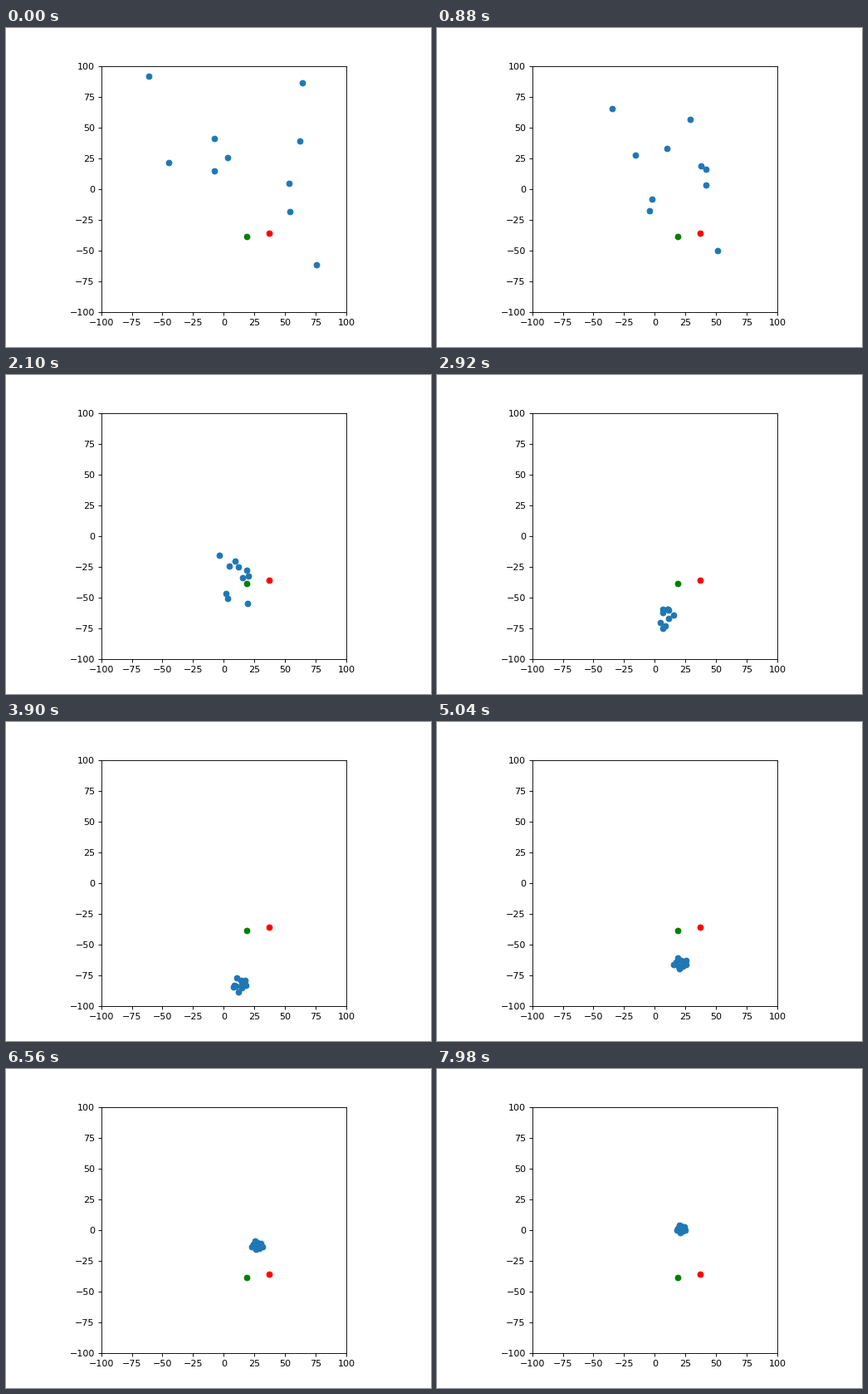
These frames come from a looping animation (512x384 px, 8000 ms). A matplotlib script:

```python
import numpy as np
import matplotlib.pyplot as plt
from matplotlib.animation import FuncAnimation

FRAMES, INTERVAL = 400, 20

# Start places (stage pixels) and start velocities relative to the flock
START = np.array([(172, 58), (357, 66), (251, 133), (354, 136), (267, 156),
                  (196, 162), (251, 172), (341, 187), (342, 221), (374, 285)])
VEL = np.array([(.49, -.32), (-1.56, .08), (1.03, -.56), (-.73, .42), (-.58, 1.88),
                (1.09, -1.3), (-.12, 1.97), (.1, -1.29), (.06, -1.58), (-.42, .2)])

SWING = .01755               # flock's swing around the green dot, rad per frame
DAMP, TURN = .0187, .013     # how each particle closes in on the flock


def to_data(px):
    """Stage pixels to axis units."""
    return (np.asarray(px) - (262.4, 193.92)) / (1.4784, -1.4784)


def flock_center(t):
    x = 291.3 - 12 * np.cos(SWING * (t - 145.5)) - 11 * np.exp(-t / 110)
    y = 251 + (62 + 38 * np.exp(-t / 80)) * np.sin(SWING * (t - 111))
    return np.array([x, y])


OFFSET = START - flock_center(0)


def closing_in(t):
    """Damped oscillation of every particle towards the flock's center."""
    sway = OFFSET * np.cos(TURN * t)
    push = (VEL + DAMP * OFFSET) / TURN * np.sin(TURN * t)
    return np.exp(-DAMP * t) * (sway + push)


def huddle(t):
    """Gap the particles keep once they are close: a shrinking sunflower."""
    i = np.arange(len(START))
    angle = i * np.pi * (3 - 5 ** .5)
    radius = 16 * np.exp(-t / 400) * np.sqrt((i + .5) / len(i))
    fade = 1 / (1 + np.exp((150 - t) / 25))
    return fade * radius[:, None] * np.column_stack([np.cos(angle), np.sin(angle)])


def swarm(t):
    return to_data(flock_center(t) + closing_in(t) + huddle(t))


fig = plt.figure(figsize=(6.4, 4.8), dpi=80)
ax = fig.add_subplot()
ax.set_aspect("equal")
ax.set(xlim=(-100, 100), ylim=(-100, 100),
       xticks=range(-100, 101, 25), yticks=range(-100, 101, 25))

dots = ax.scatter(*swarm(0).T)
ax.scatter(37.2, -36.1, color="red")
ax.scatter(18.9, -38.6, color="green")


def update(i):
    dots.set_offsets(swarm(i))
    return dots,


anim = FuncAnimation(fig, update, frames=FRAMES, interval=INTERVAL,
                     repeat=True, repeat_delay=0)
plt.show()
```
